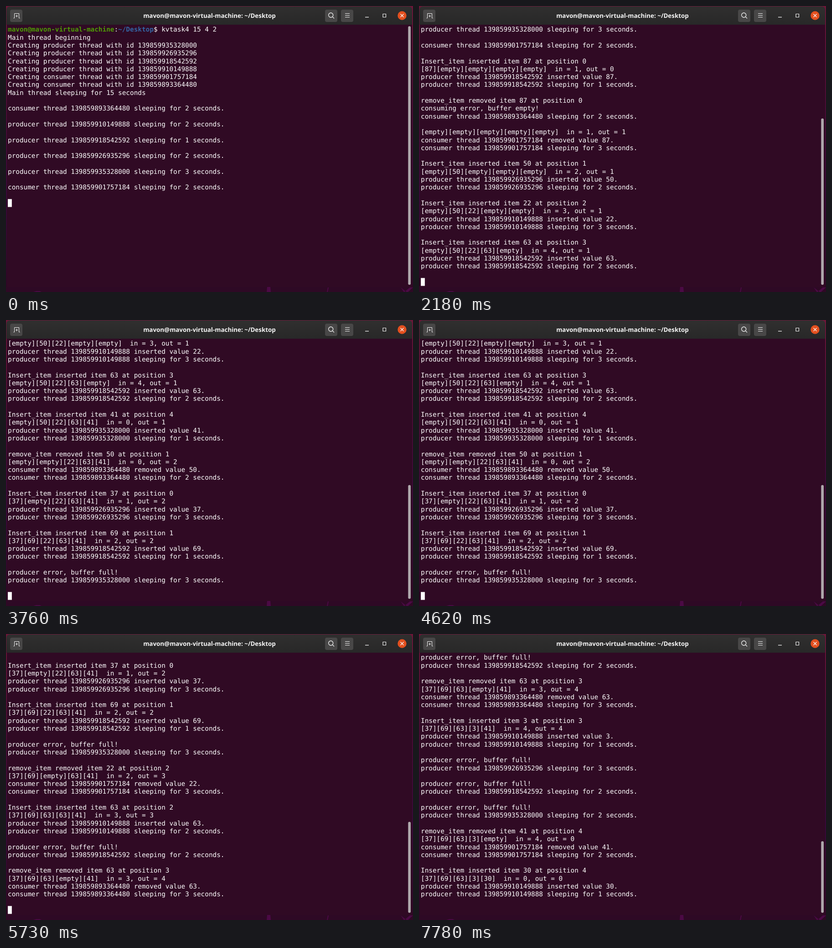
An HTML page with a canvas for the animation above (8 s loop, 893 by 627 pixels).

```html
<!DOCTYPE html>
<html lang="en">
<head>
<meta charset="utf-8">
<title>Terminal</title>
<style>
  html, body { margin: 0; width: 100%; height: 100%; overflow: hidden; background: #300a24; }
  canvas { position: absolute; left: 0; top: 0; }
  #title, pre { position: absolute; margin: 0; color: #fff; white-space: pre; text-rendering: geometricPrecision; }
  #title { left: 0; top: 9px; width: 893px; text-align: center; font: 700 13.4px/24px "Noto Sans", "Open Sans", sans-serif; color: #f7f7f7; }
  pre { left: 4px; top: 44.4px; font: 14.376px/17.3px "DejaVu Sans Mono", monospace; }
  .user { color: #4e9a06; font-weight: 700; }
  .path { color: #3465a4; font-weight: 700; }
</style>
</head>
<body>
<canvas id="stage" width="893" height="627"></canvas>
<div id="title">mavon@mavon-virtual-machine: ~/Desktop</div>
<pre><span id="prompt"><span class="user">mavon@mavon-virtual-machine</span>:<span class="path">~/Desktop</span>$ kvtask4 15 4 2
</span><span id="output"></span></pre>
<script>
const LOOP = 8000, ROWS = 33, LINE = 17.3, GRID_TOP = 42.4;
const ctx = document.getElementById('stage').getContext('2d');
const prompt = document.getElementById('prompt');
const output = document.getElementById('output');

// Transcript: threads 0-3 produce, 4-5 consume, sharing a ring buffer.
const log = [];
const slots = Array(5).fill('empty');
let head = 0, tail = 0;

const say = (...lines) => log.push(...lines);
const threadId = n => 139859935328000 - n * 8392704;
const role = n => n < 4 ? 'producer' : 'consumer';
const thread = n => `${role(n)} thread ${threadId(n)}`;
const sleep = (n, s) => say(`${thread(n)} sleeping for ${s} seconds.`, '');
const dump = () => say(`${slots.map(v => `[${v}]`).join('')}  in = ${head}, out = ${tail}`);

function insert(n, value, s) {
  say(`Insert_item inserted item ${value} at position ${head}`);
  slots[head] = value;
  head = (head + 1) % 5;
  dump();
  say(`${thread(n)} inserted value ${value}.`);
  sleep(n, s);
}
function remove(n, s, interrupt) {
  const value = slots[tail];
  say(`remove_item removed item ${value} at position ${tail}`);
  slots[tail] = 'empty';
  tail = (tail + 1) % 5;
  if (interrupt) interrupt();
  dump();
  say(`${thread(n)} removed value ${value}.`);
  sleep(n, s);
}
function full(n, s) {
  say('producer error, buffer full!');
  sleep(n, s);
}

const beats = [];
function beat(time, run) {
  run();
  beats.push({ time, length: log.length });
}

beat(0, () => {
  say('', 'Main thread beginning');
  for (let n = 0; n < 6; n++) say(`Creating ${role(n)} thread with id ${threadId(n)}`);
  say('Main thread sleeping for 15 seconds', '');
  sleep(5, 2); sleep(3, 2); sleep(2, 1); sleep(1, 2); sleep(0, 3); sleep(4, 2);
});
beat(860, () => insert(2, 87, 1));
beat(1780, () => {
  remove(4, 3, () => {
    say('consuming error, buffer empty!');
    sleep(5, 2);
  });
  insert(1, 50, 2); insert(3, 22, 3); insert(2, 63, 2);
});
beat(2830, () => insert(0, 41, 1));
beat(3760, () => { remove(5, 2); insert(1, 37, 3); insert(2, 69, 1); full(0, 3); });
beat(4740, () => { remove(4, 3); insert(3, 63, 2); full(2, 2); });
beat(5730, () => remove(5, 3));
beat(6720, () => { insert(3, 3, 1); full(1, 3); full(2, 2); full(0, 2); });
beat(7780, () => { remove(4, 2); insert(3, 30, 1); });

// The cursor starts visible and toggles at each of these times.
const blinks = [430, 980, 1660, 2180, 2830, 3390, 4030, 4620, 5170, 5730, 6450, 6970, 7500];

function rect(x, y, w, h, color) {
  ctx.fillStyle = color;
  ctx.fillRect(x, y, w, h);
}
function rounded(x, y, w, h, r, color) {
  ctx.fillStyle = color;
  ctx.beginPath();
  ctx.roundRect(x, y, w, h, r);
  ctx.fill();
}
function stroke(path, width = 1.2) {
  ctx.strokeStyle = '#f4f4f4';
  ctx.lineWidth = width;
  ctx.stroke(new Path2D(path));
}
function shade(x0, y0, x1, y1, ...colors) {
  const g = ctx.createLinearGradient(x0, y0, x1, y1);
  colors.forEach((c, i) => g.addColorStop(i / (colors.length - 1), c));
  return g;
}
function poly(d, color) {
  ctx.fillStyle = color;
  ctx.fill(new Path2D(d));
}

function drawWindow() {
  rect(0, 0, 893, 627, shade(0, 0, 0, 627, '#6a1738', '#4a0d35', '#38093a', '#2c0824'));
  rect(2, 41, 889, 575, '#300a24');
  rect(0, 616, 893, 11, '#2e0925');
  poly('M573 616H580L581 627H572ZM706 617H708L706 627H704ZM866 617L873 627H879ZM886 617H893L882 627H874ZM60 627L66 625H74L78 627Z', '#4b0a45');
  rounded(1, 1, 890, 40, [7, 7, 0, 0], shade(0, 1, 0, 41, '#302f2f', '#282828'));

  for (const x of [9, 700, 735]) rounded(x, 8, 27, 27, 4, '#484747');
  stroke('M16.5 26.5H18.5V16.5H28.5V26.5H30.5M23.5 19.5V24.5M21 22H26', 1);
  stroke('M717.7 20A5 5 0 1 1 707.7 20A5 5 0 1 1 717.7 20M716.3 23.6L720 27.3', 1.3);
  stroke('M744 16.5H754M744 20.5H754M744 24.5H754');
  stroke('M788 24.5H796', 1.3);
  stroke('M827 17.5H833.5V24.5H827Z');
  rounded(859.3, 11.3, 19.4, 19.4, 9.7, '#e4501f');
  stroke('M865.5 17.5L872.5 24.5M872.5 17.5L865.5 24.5', 1.4);
}

function drawScrollbar(total) {
  const height = 573 * ROWS / total - 6;
  rounded(882.3, 611.3 - height, 5.7, height, 2.8, '#aea7ab');
}

function render(time) {
  const { length } = beats.findLast(b => b.time <= time);
  const top = Math.max(0, length + 1 - ROWS);
  const cursorOn = blinks.filter(t => t <= time).length % 2 === 0;

  drawWindow();
  drawScrollbar(Math.max(ROWS, length + 1));
  if (cursorOn) rect(4, GRID_TOP + 0.3 + (length - top) * LINE, 8.8, LINE, '#fff');

  const text = log.slice(Math.max(1, top), length).join('\n');
  if (output.textContent !== text) output.textContent = text;
  prompt.hidden = top > 0;
}

const start = performance.now();
function tick() {
  render((performance.now() - start) % LOOP);
  requestAnimationFrame(tick);
}
tick();
</script>
</body>
</html>
```
